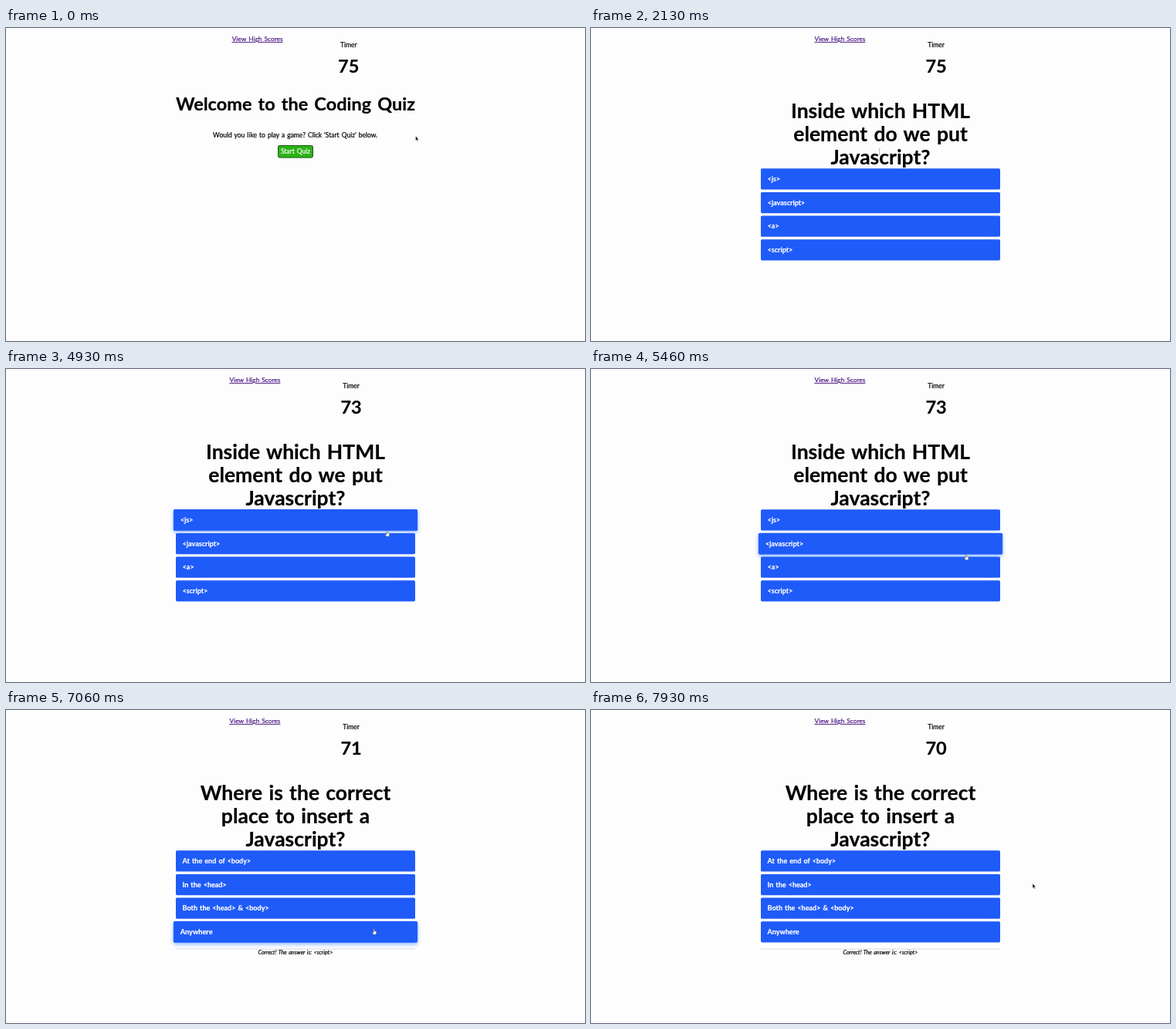
Animation of 750 by 406 pixels, one loop 8 s. Source, as an HTML page:

```html
<!DOCTYPE html>
<html lang="en">
<head>
<meta charset="utf-8">
<title>Coding quiz</title>
<style>
  html, body { margin: 0; width: 100%; height: 100%; overflow: hidden; background: #fdfdfd; }
  svg { display: block; width: 750px; height: 406px; }
  text { font: 8.5px Lato, "Open Sans", sans-serif; word-spacing: .1em; stroke: #000; stroke-width: .2px; }
  .mid { text-anchor: middle; }
  .link { font-size: 8.4px; fill: #4a1480; stroke: #4a1480; text-decoration: underline; }
  .title { font-size: 23.5px; font-weight: 700; }
  .question { font-size: 26.5px; font-weight: 700; word-spacing: .07em; }
  .note { font-size: 7.2px; font-style: italic; }
  .white { fill: #fff; stroke: #fff; }
  .row { transform-box: fill-box; transform-origin: center; }
  .row.over { transform: scale(1.02); filter: drop-shadow(0 2px 2.5px rgba(40, 120, 255, .55)); }
  .row rect { fill: #1f5bf8; }
  .row text { font-size: 9px; font-weight: 700; }
</style>
</head>
<body>
<svg viewBox="0 0 750 406">
  <text id="link" class="link" y="17">View High Scores</text>
  <g id="timer" class="mid">
    <text y="25.3">Timer</text>
    <text id="count" class="title" y="58"></text>
  </g>
  <g id="intro" class="mid">
    <text class="title" x="375" y="106.5">Welcome to the Coding Quiz</text>
    <text x="374.7" y="141.5">Would you like to play a game? Click 'Start Quiz' below.</text>
    <rect x="352.5" y="152.5" width="45" height="15.6" rx="1.8" fill="#2bb216" stroke="#23591c"/>
    <text class="white" x="375" y="163.4">Start Quiz</text>
  </g>
  <g id="quiz">
    <g id="question" class="mid"></g>
    <g id="rows"></g>
    <g id="note" class="mid">
      <path d="M220 310H530" stroke="#ddd"/>
      <text class="note" x="375" y="317">Correct! The answer is: &lt;script&gt;</text>
    </g>
  </g>
  <g id="cursor" stroke-linejoin="round">
    <path id="arrow" d="M0 0V6.2L1.4 5 2.4 7.2 3.4 6.8 2.5 4.6H4.3Z" fill="#111" stroke="#fff" stroke-width=".5"/>
    <path id="hand" d="M-.6 0Q0-.6.6 0V2.6L3.2 3.2Q3.6 5.5 2.5 7.2H-.8L-2.3 4.6 -1.8 4-.6 4.8Z" fill="#fff" stroke="#345" stroke-width=".5"/>
    <path id="beam" d="M-1 0Q.5 0 .5 1V8Q.5 9-1 9M2 0Q.5 0 .5 1V8Q.5 9 2 9" fill="none" stroke="#b9b4d8" stroke-width=".7"/>
  </g>
</svg>
<script>
const $ = id => document.getElementById(id);
const LOOP = 8000, START = 1890, ANSWERED = 6200, LEAVE_TEXT = 3430;
const ROW_TOP = 182.3, ROW_STEP = 30.65, ROW_HEIGHT = 27.2;

const questions = [
  { lines: ['Inside which HTML', 'element do we put', 'Javascript?'],
    choices: ['<js>', '<javascript>', '<a>', '<script>'] },
  { lines: ['Where is the correct', 'place to insert a', 'Javascript?'],
    choices: ['At the end of <body>', 'In the <head>', 'Both the <head> & <body>', 'Anywhere'] }
];

// Pointer path: time, x, y
const path = [
  [60, 530.5, 140], [250, 495, 144], [550, 400, 154], [800, 373, 156], [LEAVE_TEXT, 373, 156],
  [3700, 490, 167], [3930, 546.5, 187], [4330, 547, 189], [4650, 512, 199], [4930, 493.5, 210],
  [5450, 486, 240], [6000, 478, 268], [6130, 476.7, 284], [7100, 476.7, 284],
  [7400, 497, 272], [7620, 530, 253], [7930, 572, 225]
];

function pointerAt(t) {
  const i = path.findIndex(p => p[0] > t);
  if (i < 1) return (i ? path.at(-1) : path[0]).slice(1);
  const [a, b] = [path[i - 1], path[i]];
  const k = (t - a[0]) / (b[0] - a[0]);
  return [a[1] + (b[1] - a[1]) * k, a[2] + (b[2] - a[2]) * k];
}

function add(parent, tag, attrs) {
  const el = document.createElementNS('http://www.w3.org/2000/svg', tag);
  for (const key in attrs) el.setAttribute(key, attrs[key]);
  return parent.appendChild(el);
}

const lines = [117, 147, 177].map(y => add($('question'), 'text', { class: 'question', x: 375, y }));
const rows = [0, 1, 2, 3].map(i => {
  const y = ROW_TOP + i * ROW_STEP, row = add($('rows'), 'g', { class: 'row' });
  add(row, 'rect', { x: 220, y, width: 310, height: ROW_HEIGHT, rx: 1.6 });
  return { row, label: add(row, 'text', { class: 'white', x: 228.6, y: y + 16.8 }) };
});

function show(id, on) { $(id).style.display = on ? '' : 'none'; }

function hoveredRow(x, y) {
  const i = Math.floor((y - ROW_TOP) / ROW_STEP);
  const inside = x > 220 && x < 530 && y - ROW_TOP - i * ROW_STEP < ROW_HEIGHT + .6;
  return inside ? i : -1;
}

function draw(t) {
  const playing = t >= START, second = t >= ANSWERED;
  const [x, y] = pointerAt(t);
  const hovered = playing ? hoveredRow(x, y) : -1;
  const { lines: words, choices } = questions[+second];

  show('intro', !playing);
  show('quiz', playing);
  show('note', second);
  $('link').setAttribute('x', playing ? 289.5 : 292.7);
  $('timer').setAttribute('transform', `translate(${playing ? 447 : 443.7})`);
  // The first tick still shows the full time
  $('count').textContent = Math.min(75, 76 - Math.floor((t - START) / 1000));
  lines.forEach((el, i) => el.textContent = words[i]);
  rows.forEach(({ row, label }, i) => {
    label.textContent = choices[i];
    row.classList.toggle('over', i === hovered);
  });

  const onButton = !playing && x > 352 && x < 398 && y > 152 && y < 168;
  const onText = playing && t < LEAVE_TEXT;
  const hand = onButton || hovered >= 0;
  $('cursor').setAttribute('transform', `translate(${x} ${y})`);
  show('hand', hand);
  show('beam', onText);
  show('arrow', !hand && !onText);
}

function tick(now) {
  draw(now % LOOP);
  requestAnimationFrame(tick);
}
requestAnimationFrame(tick);
</script>
</body>
</html>
```
